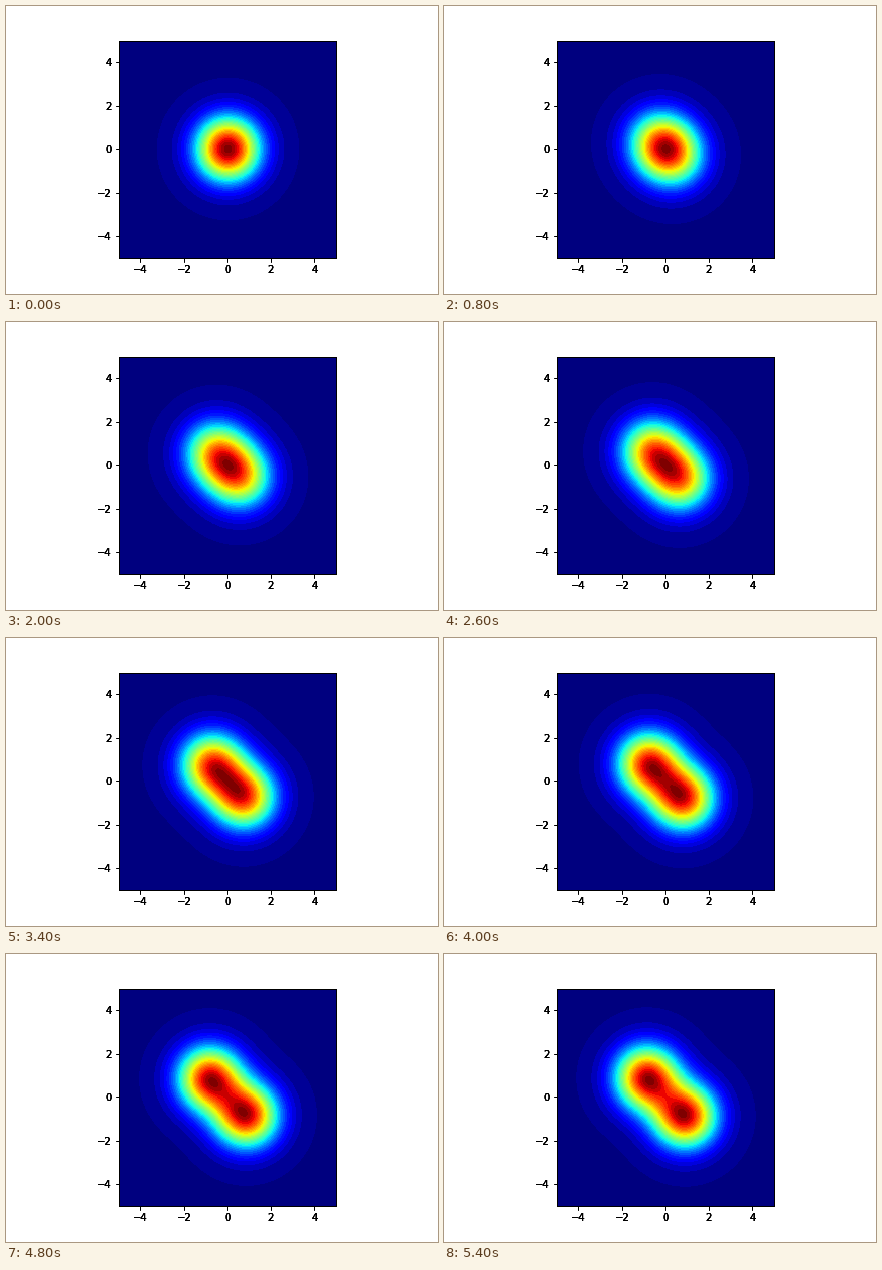
A matplotlib script for the animation above (6 s loop, 432 by 288 pixels).

```python
import numpy as np
import matplotlib.pyplot as plt
from matplotlib.animation import FuncAnimation
from matplotlib.colors import ListedColormap

FRAMES, INTERVAL = 30, 200
LIMIT = 5
PIXELS = 217
# Steps at which the picture is refreshed; it holds in between.
REFRESH = np.array([0, 2, 4, 5, 6, 8, 10, 12, 13, 17, 19, 20, 21, 22, 23, 24, 27])

half = LIMIT * (1 - 1 / PIXELS)
x, y = np.meshgrid(np.linspace(-half, half, PIXELS),
                   np.linspace(-half, half, PIXELS))
along = (x - y) / np.sqrt(2)
envelope = np.exp(-(x**2 + y**2) / 2)


def banded_jet(first=0.0045, width=0.0316, size=1024):
    """Jet in flat bands, with a thin lowest band for the background."""
    level = np.linspace(0, 1, size)
    band = np.floor((level - first) / width)
    middle = np.where(band < 0, 0, first + (band + 0.5) * width)
    return ListedColormap(plt.get_cmap("jet")(np.clip(middle, 0, 1)))


def separation(step):
    """Distance of each lobe from the centre."""
    s = step / REFRESH[-1]
    return np.sqrt(1.35 * s + 0.95 * s**2 - 0.8 * s**3)


def density(step):
    """Two unit Gaussians moving apart on the diagonal, scaled to peak 1."""
    field = envelope * np.cosh(separation(step) * along)
    return field / field.max()


def add_axes():
    ax = fig.add_axes([left, bottom, side / 432, side / 288], facecolor="none")
    ax.set(xlim=(-LIMIT, LIMIT), ylim=(-LIMIT, LIMIT),
           xticks=range(-4, 5, 2), yticks=range(-4, 5, 2))
    return ax


plt.rcParams.update({"font.family": "DejaVu Sans", "font.size": 10})
fig = plt.figure(figsize=(6, 4), dpi=72, facecolor="white")
side = 0.755 * 288
left, bottom = 0.5125 - side / 432 / 2, 0.125

ax = add_axes()
image = ax.imshow(density(0), origin="lower", cmap=banded_jet(), vmin=0, vmax=1,
                  extent=(-LIMIT, LIMIT, -LIMIT, LIMIT),
                  interpolation="nearest", aspect="auto")
# Stacked copies of the frame harden the edges of labels and ticks.
for _ in range(3):
    add_axes()


def update(frame):
    image.set_data(density(REFRESH[REFRESH <= frame].max()))
    return [image]


anim = FuncAnimation(fig, update, frames=FRAMES, interval=INTERVAL,
                     repeat=True, repeat_delay=0)
plt.show()
```
